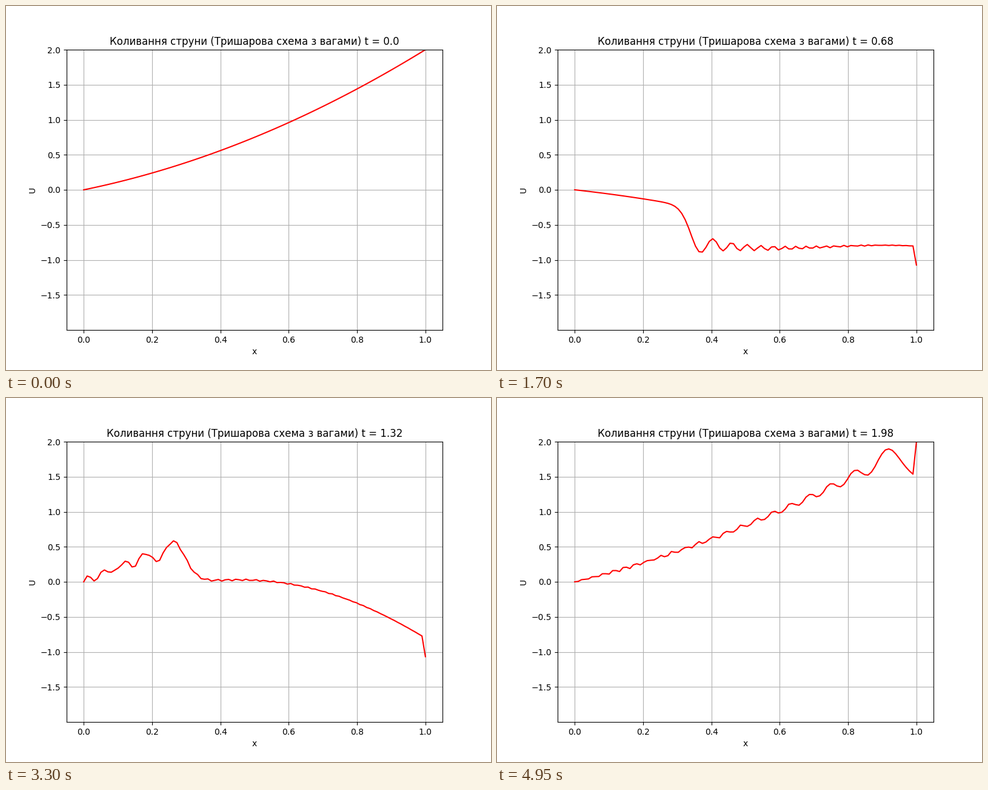
A matplotlib script for the animation above (5 s loop, 800 by 600 pixels).

```python
import numpy as np
import matplotlib.pyplot as plt
from matplotlib.animation import FuncAnimation

NODES, LEVELS, SKIP = 100, 2000, 20
SIGMA = 0.25  # weight of the outer time layers

x = np.linspace(0, 1, NODES)
t = np.linspace(0, 2, LEVELS)
h, tau = x[1], t[1]
shape = x**2 + x


def laplace(v):
    return (v[2:] - 2 * v[1:-1] + v[:-2]) / h**2


def source(time):
    return -np.cos(np.pi * time) * (np.pi**2 * shape[1:-1] + 2)


def solve():
    size = NODES - 2
    second = (np.eye(size, k=1) - 2 * np.eye(size) + np.eye(size, k=-1)) / h**2
    step = np.linalg.inv(np.eye(size) - SIGMA * tau**2 * second)

    u = np.zeros((LEVELS, NODES))
    u[0] = shape
    u[:, -1] = 2 * np.cos(np.pi * t)
    u[1, 1:-1] = u[0, 1:-1] + tau**2 / 2 * (laplace(u[0]) + source(0))
    for n in range(1, LEVELS - 1):
        # The new layer's edge value is left out of the implicit part.
        known = (1 - 2 * SIGMA) * laplace(u[n]) + SIGMA * laplace(u[n - 1])
        rhs = 2 * u[n, 1:-1] - u[n - 1, 1:-1] + tau**2 * (known + source(t[n]))
        u[n + 1, 1:-1] = step @ rhs
    return u


u = solve()

plt.rcParams["font.family"] = "DejaVu Sans"
fig, ax = plt.subplots(figsize=(8, 6), dpi=100)
line, = ax.plot(x, u[0], color="red", lw=1.5)
ax.set_xlim(-0.05, 1.05)
ax.set_ylim(-2, 2)
ax.set_yticks(np.arange(-1.5, 2.1, 0.5))
ax.set_xlabel("x")
ax.set_ylabel("U")
ax.grid(True)
title = ax.set_title("")


def update(frame):
    n = frame * SKIP
    line.set_ydata(u[n])
    time = round(float(t[n]), 2)
    title.set_text(f"Коливання струни (Тришарова схема з вагами) t = {time}")
    return line, title


anim = FuncAnimation(fig, update, frames=LEVELS // SKIP, interval=50,
                     repeat=True, repeat_delay=0, blit=False)
plt.show()
```
